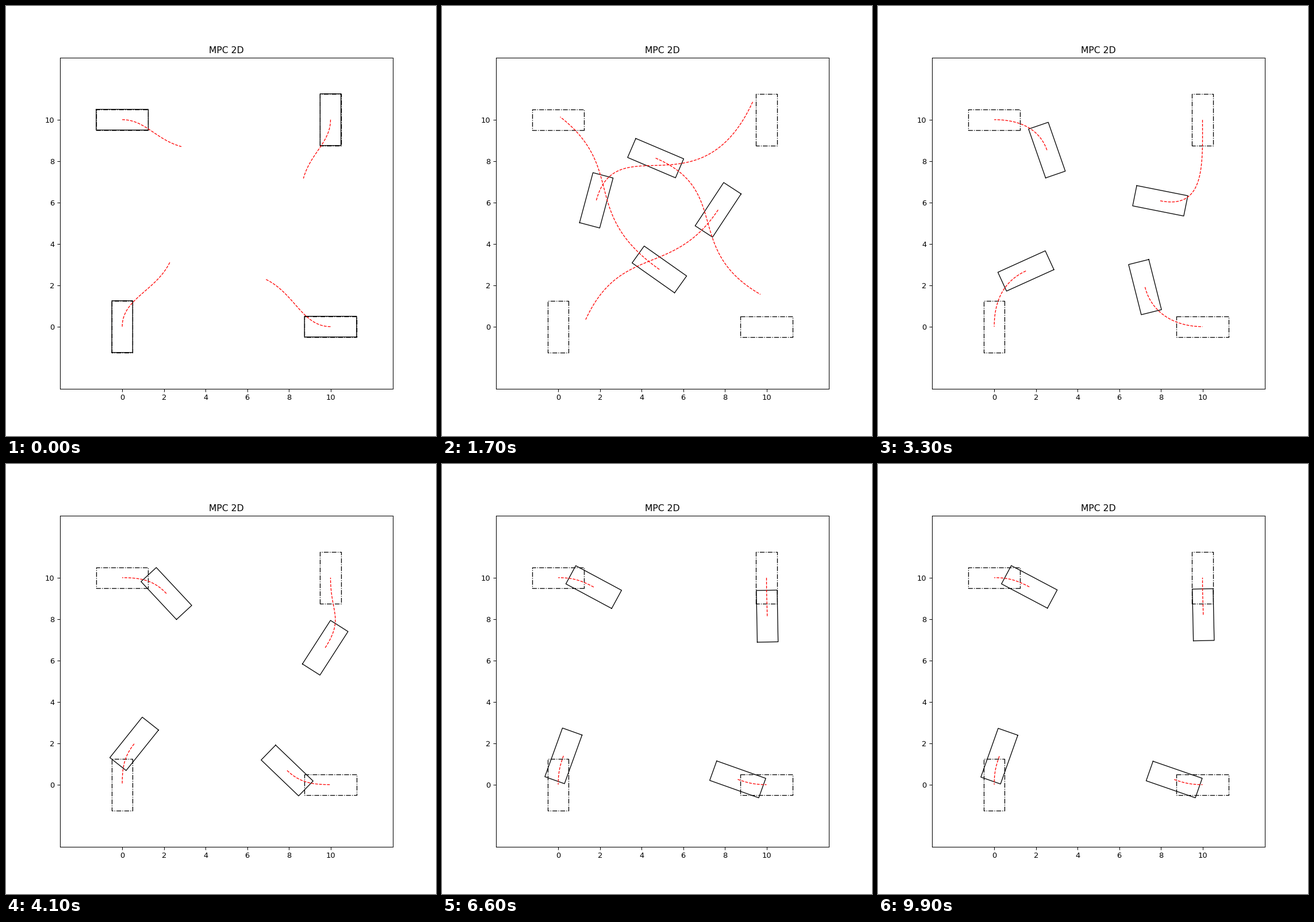
Recreate the animation shown at these times as a matplotlib script. Size 748 px wide and 748 px high, loop 10000 ms.

```python
import numpy as np
import matplotlib.pyplot as plt
from matplotlib.animation import FuncAnimation

FRAMES, INTERVAL = 100, 100
KEYS = np.array([0, 12, 23, 33, 50])    # frames of the key poses
CRUISE, LOOKAHEAD = 0.5, 0.8            # speeds in units per frame
SETTLE_RATE = 0.11
LENGTH, WIDTH = 2.5, 1.0


def unit(degrees):
    a = np.radians(degrees)
    return np.stack([np.cos(a), np.sin(a)], axis=-1)


def hermite(x, xs, points, slopes):
    """Cubic Hermite interpolation of 2D points at x."""
    i = min(np.searchsorted(xs, x, side="right"), len(xs) - 1) - 1
    h = xs[i + 1] - xs[i]
    u = min((x - xs[i]) / h, 1)
    ease = 3*u**2 - 2*u**3
    return ((1 - ease) * points[i] + ease * points[i + 1]
            + h * ((u**3 - 2*u**2 + u) * slopes[i] + (u**3 - u**2) * slopes[i + 1]))


def bezier(start, start_angle, end, end_angle, handles):
    """Curve between two poses; handles are fractions of their distance."""
    reach = np.hypot(*(end - start))
    p1 = start + handles[0] * reach * unit(start_angle)
    p2 = end - handles[1] * reach * unit(end_angle)
    u = np.linspace(0, 1, 60)[:, None]
    return (1-u)**3 * start + 3*u*(1-u)**2 * p1 + 3*u**2*(1-u) * p2 + u**3 * end


def box(center, degrees):
    forward = unit(degrees)
    side = np.array([-forward[1], forward[0]])
    signs = [(-1, 1), (1, 1), (1, -1), (-1, -1), (-1, 1)]
    return np.array([center + a * LENGTH / 2 * forward + b * WIDTH / 2 * side
                     for a, b in signs])


class Car:
    def __init__(self, goal, poses, rest, braking, aims, bend, late_bend=0.39):
        poses = np.array(poses, float)
        self.points, angles = poses[:, :2], poses[:, 2]
        self.last, self.rest = poses[-1], np.array(rest)
        drift = np.hypot(*(self.rest - self.last)[:2]) * SETTLE_RATE
        speeds = np.array([0.02, CRUISE, CRUISE, braking, drift])
        self.slopes = unit(angles) * speeds[:, None]

        # The plan aims at a point ahead until the goal comes within reach.
        self.goal = np.array(goal, float)
        aims = np.array([*aims, goal], float)
        self.aim_points, self.aim_angles = aims[:, :2], aims[:, 2]
        self.aim_slopes = unit(self.aim_angles) * np.array([[0], [LOOKAHEAD], [0]])
        self.bends = np.array([(0.35, 0.4), (0.55, 0.42), bend, (late_bend,) * 2])

    def pose(self, t):
        if t >= KEYS[-1]:
            fade = np.exp(-SETTLE_RATE * (t - KEYS[-1]))
            state = self.rest + (self.last - self.rest) * fade
            return state[:2], state[2]
        here, ahead = (hermite(x, KEYS, self.points, self.slopes)
                       for x in (t, t + 1e-3))
        dx, dy = ahead - here
        return here, np.degrees(np.arctan2(dy, dx))

    def plan(self, t):
        aim = hermite(t, KEYS[:3], self.aim_points, self.aim_slopes)
        angle = np.interp(t, KEYS[:3], self.aim_angles)
        handles = [np.interp(t, KEYS[:4], b) for b in self.bends.T]
        return bezier(*self.pose(t), aim, angle, handles)


cars = [
    Car(goal=(10, 10, 90),
        poses=[(0, 0, 90), (.99, 2.83, 68.4), (3.73, 8.71, -3.8),
               (7.97, 6.08, -11.3), (10.03, 7.81, 90.3)],
        rest=(10.035, 8.21, 91.2), braking=.38,
        aims=[(2.3, 3.14, 65), (7.36, 10.05, 45)],
        bend=(.26, .97), late_bend=.5),
    Car(goal=(0, 10, 180),
        poses=[(10, 0, 180), (7.29, 1.21, 146.5), (2.8, 5.26, 101.7),
               (2.53, 8.53, 109.1), (1.79, 9.5, 149.8)],
        rest=(1.685, 9.555, 152), braking=.13,
        aims=[(6.86, 2.3, 155), (.88, 8.27, 110)],
        bend=(.52, .52)),
    Car(goal=(0, 0, 270),
        poses=[(10, 10, 270), (9.1, 7.81, 232.4), (5.58, 3.5, 207.3),
               (1.52, 2.69, 204.5), (.28, 1.46, 248.6)],
        rest=(.245, 1.375, 250.6), braking=.19,
        aims=[(8.7, 7.16, 255), (3.8, 2.08, 225)],
        bend=(.38, .57)),
    Car(goal=(10, 0, 0),
        poses=[(0, 10, 0), (2.23, 9.17, -27.9), (6.99, 6.3, -64.5),
               (7.24, 1.91, -75.9), (8.51, .29, -22)],
        rest=(8.64, .246, -19.2), braking=.23,
        aims=[(2.84, 8.7, -15), (8.28, 4.46, -55)],
        bend=(.4, .64)),
]

fig, ax = plt.subplots(figsize=(8, 8), dpi=93.5)
ax.set(xlim=(-3, 13), ylim=(-3, 13), title="MPC 2D",
       xticks=range(0, 11, 2), yticks=range(0, 11, 2))

for car in cars:
    ax.plot(*box(car.goal[:2], car.goal[2]).T, "k-.", lw=1)
bodies = [ax.plot([], [], "k-", lw=1)[0] for _ in cars]
routes = [ax.plot([], [], "r--", lw=1)[0] for _ in cars]


def update(frame):
    for car, body, route in zip(cars, bodies, routes):
        body.set_data(*box(*car.pose(frame)).T)
        route.set_data(*car.plan(frame).T)
    return bodies + routes


anim = FuncAnimation(fig, update, frames=FRAMES, interval=INTERVAL, repeat=True)
plt.show()
```
